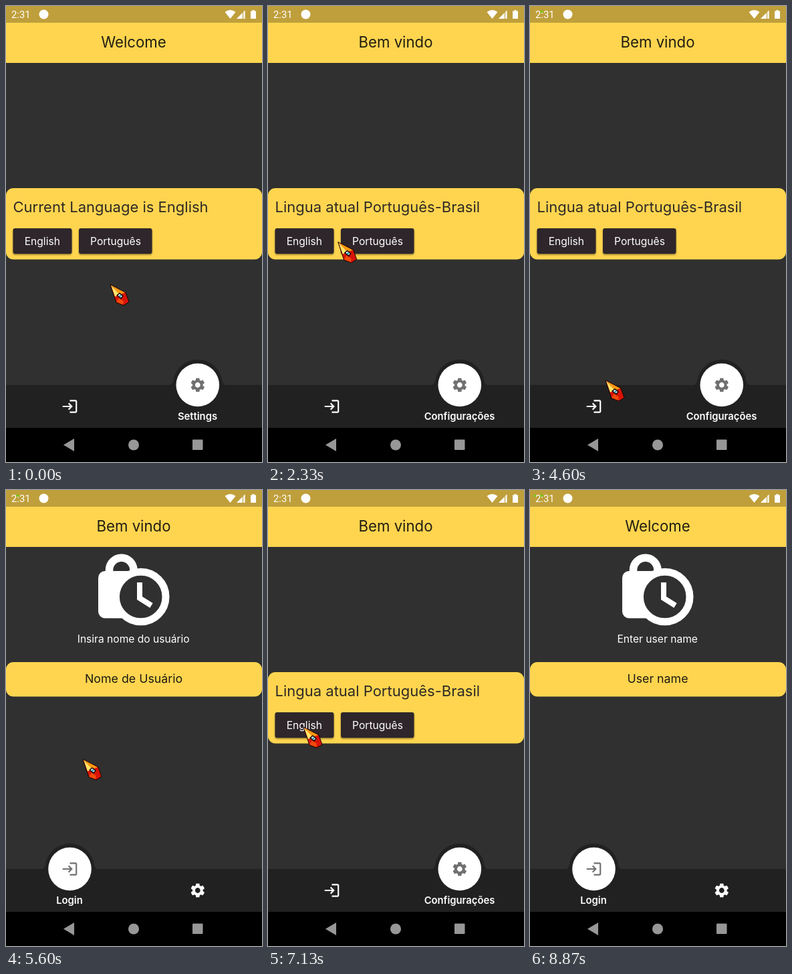
Animation, 383 px wide and 681 px high, one loop 9.94 s. Source, as an HTML page:

```html
<!DOCTYPE html>
<html lang="en">
<head>
<meta charset="utf-8">
<title>Language switch</title>
<style>
  html, body { margin: 0; width: 100%; height: 100%; overflow: hidden; background: #303030; }
  svg { display: block; width: 383px; height: 681px; font-family: Inter, sans-serif; }
  .mid { text-anchor: middle; }
  .tab { font-size: 14.8px; font-weight: 600; fill: #fff; }
  .button { font-size: 15.6px; fill: #fff; }
  .face { fill: #2f262b; }
</style>
</head>
<body>
<svg viewBox="0 0 383 681">
  <defs>
    <path id="loginIcon" d="M11 7 9.6 8.4l2.6 2.6H2v2h10.2l-2.6 2.6L11 17l5-5zm9 12h-8v2h8c1.1 0 2-.9 2-2V5c0-1.1-.9-2-2-2h-8v2h8z" transform="scale(1.08) translate(-12 -12)"/>
    <path id="settingsIcon" d="M19.14 12.94c.04-.3.06-.61.06-.94s-.02-.64-.07-.94l2.03-1.58c.18-.14.23-.41.12-.61l-1.92-3.32c-.12-.22-.37-.29-.59-.22l-2.39.96c-.5-.38-1.03-.7-1.62-.94l-.36-2.54c-.04-.24-.24-.41-.48-.41h-3.84c-.24 0-.43.17-.47.41l-.36 2.54c-.59.24-1.13.57-1.62.94l-2.39-.96c-.22-.08-.47 0-.59.22L2.74 8.87c-.12.21-.08.47.12.61l2.03 1.58c-.05.3-.09.63-.09.94s.02.64.07.94l-2.03 1.58c-.18.14-.23.41-.12.61l1.92 3.32c.12.22.37.29.59.22l2.39-.96c.5.38 1.03.7 1.62.94l.36 2.54c.05.24.24.41.48.41h3.84c.24 0 .44-.17.47-.41l.36-2.54c.59-.24 1.13-.56 1.62-.94l2.39.96c.22.08.47 0 .59-.22l1.92-3.32c.12-.22.07-.47-.12-.61zM12 15.6c-1.98 0-3.6-1.62-3.6-3.6s1.62-3.6 3.6-3.6 3.6 1.62 3.6 3.6-1.62 3.6-3.6 3.6z" transform="scale(1.08) translate(-12 -12)"/>
    <clipPath id="englishClip"><rect x="10.5" y="332" width="88" height="38" rx="3"/></clipPath>
    <clipPath id="portugueseClip"><rect x="109" y="332" width="109.5" height="38" rx="3"/></clipPath>
    <filter id="shadow" x="-10%" y="-20%" width="120%" height="150%">
      <feDropShadow dx="0" dy="1.5" stdDeviation="1.2" flood-opacity=".45"/>
    </filter>
  </defs>

  <rect width="383" height="681" fill="#303030"/>
  <rect width="383" height="85" fill="#ffd54f"/>
  <rect width="383" height="25" fill="#bf9f3b"/>
  <text x="8" y="18" font-size="14.8" fill="#fff" style="font-family:Roboto,sans-serif">2:31</text>
  <g fill="#fff">
    <circle cx="56.5" cy="12.5" r="7"/>
    <path d="M327.500 9Q335.500 3 343.500 9L335.500 19z"/>
    <path d="M357.500 6.500V19H345z" opacity=".35"/>
    <path d="M353.500 10.500V19H345zM355.500 8.500l2-2V19h-2z"/>
    <path d="M368.500 6h3v1.500h2.500V19h-8V7.500h2.500z"/>
  </g>
  <g fill="#7fc31c">
    <path id="leftDot" d="M5 7h4v3h-4z"/>
    <path id="rightDot" d="M15 7h5v3h-5z"/>
  </g>
  <text id="title" class="mid" x="191" y="62" font-size="22.2" fill="#211d12"></text>

  <g id="settingsPage">
    <rect y="272" width="383" height="106.500" rx="11" fill="#ffd54f"/>
    <text id="current" x="10.500" y="308" font-size="22" fill="#2f2926"></text>
    <g filter="url(#shadow)">
      <rect class="face" x="10.500" y="332" width="88" height="38" rx="3"/>
      <rect class="face" x="109" y="332" width="109.500" height="38" rx="3"/>
    </g>
    <circle id="ripple" fill="#fff"/>
    <text class="button mid" x="54.300" y="357">English</text>
    <text class="button mid" x="164" y="357">Português</text>
  </g>

  <g id="loginPage">
    <path d="M154.500 126v-6.500a18.200 18.200 0 0 1 36.400 0v6.500" fill="none" stroke="#fff" stroke-width="11.500"/>
    <rect x="138" y="121" width="68" height="70.500" rx="10" fill="#fff"/>
    <circle cx="201.700" cy="159.500" r="37.300" fill="#303030" stroke="#fff" stroke-width="11"/>
    <path d="M200 138v23.500l17.500 11" fill="none" stroke="#fff" stroke-width="8"/>
    <text id="prompt" class="mid" x="190.700" y="227.500" font-size="15.600" fill="#fff"></text>
    <rect y="257" width="383" height="51.500" rx="11" fill="#ffd54f"/>
    <text id="field" class="mid" x="191" y="288" font-size="17.800" fill="#1d1a12"></text>
  </g>

  <rect y="566" width="383" height="64" fill="#212121"/>
  <g id="loginTabIcon" fill="#fff"><use href="#loginIcon"/></g>
  <g id="settingsTabIcon" fill="#fff"><use href="#settingsIcon"/></g>
  <text id="loginLabel" class="tab mid" x="95">Login</text>
  <text id="settingsLabel" class="tab mid" x="286.500"></text>
  <g id="knob">
    <path d="M-45 .5Q-37 .5-36.500-7A37 37 0 0 1 36.500-7Q37 .5 45 .5z" fill="#212121"/>
    <circle r="32.300" fill="#fff"/>
    <g id="knobIcon" fill="#707070"><use id="knobUse"/></g>
  </g>

  <rect y="630" width="383" height="51" fill="#000"/>
  <g fill="#979797">
    <path d="M86 655.500l16-9.500v19z"/>
    <circle cx="191" cy="655.500" r="8"/>
    <rect x="279" y="647.500" width="15.500" height="15.500" rx="1"/>
  </g>

  <g id="cursor" stroke-linejoin="round">
    <path d="M0 0 23 12 28 26 20 31 9 27z" fill="#d81408" stroke="#170400"/>
    <path d="M1 1 22 12 14 15z" fill="#ff9c12"/>
    <path d="M1 1 14 15 7 18z" fill="#ffe66a"/>
    <path d="M9 26 13 20 20 25 19 30z" fill="#f04a0c"/>
    <path d="M9 16 14 12 20 17 16 22z" fill="#1c0d10"/>
    <path d="M11.500 16 14 14 18 17.500 15.500 19.500z" fill="#f4ffff"/>
    <circle cx="14.800" cy="17" r="1.500" fill="#18a2bd"/>
  </g>
</svg>
<script>
const LOOP = 9940, STEP = 1000 / 15, TAB_MS = 300;
const TAB_X = { login: 95.5, settings: 286.8 };
const words = {
  en: { title: "Welcome", current: "Current Language is English", prompt: "Enter user name",
        field: "User name", settingsLabel: "Settings" },
  pt: { title: "Bem vindo", current: "Lingua atual Português-Brasil", prompt: "Insira nome do usuário",
        field: "Nome de Usuário", settingsLabel: "Configurações" }
};
// [time, value] pairs, the latest one passed applies
const languages = [[-9999, "en"], [1730, "pt"], [2930, "en"], [4070, "pt"], [7330, "en"]];
const pages = [[-9999, "settings"], [5070, "login"], [6070, "settings"], [8400, "login"]];
// [time, x, y] of the pointer tip
const pointer = [
  [0, 156, 416], [70, 158, 426], [130, 161, 438], [270, 162, 439], [410, 162, 440],
  [870, 89, 362], [1270, 138, 353], [2000, 138, 353], [2670, 70, 352], [3330, 70, 352],
  [3800, 140, 354], [4070, 140, 354], [4600, 113, 559], [4800, 97, 591], [5070, 97, 591],
  [5600, 115, 402], [6000, 284, 597], [6530, 284, 595], [7000, 49, 355], [7130, 53, 354],
  [7400, 53, 354], [8200, 93, 598], [8470, 93, 598], [8870, 105, 690]
];

const $ = id => document.getElementById(id);
const clamp = v => Math.max(0, Math.min(1, v));
const mix = (a, b, p) => a + (b - a) * p;
const smooth = p => p * p * (3 - 2 * p);
const easeOut = p => 1 - (1 - p) ** 2.2;
const latest = (list, t) => list.findLast(item => item[0] <= t);
const set = (id, attrs) => { for (const k in attrs) $(id).setAttribute(k, attrs[k]); };
const show = (id, on) => set(id, { visibility: on ? "visible" : "hidden" });
const move = (id, x, y) => set(id, { transform: `translate(${x} ${y})` });

function pointerAt(t) {
  const i = pointer.findLastIndex(k => k[0] <= t);
  const a = pointer[i], b = pointer[i + 1] || a;
  const p = a === b ? 0 : smooth((t - a[0]) / (b[0] - a[0]));
  return [mix(a[1], b[1], p), mix(a[2], b[2], p)];
}

function drawRipple(t, [since, language]) {
  const age = t - since;
  const [x, y] = pointerAt(Math.max(0, since));
  set("ripple", {
    cx: x, cy: y, r: Math.min(120, age * .5),
    opacity: .24 * (1 - clamp((age - 360) / 160)),
    "clip-path": `url(#${language === "en" ? "english" : "portuguese"}Clip)`
  });
}

function drawTabs(t, [since, page]) {
  const p = clamp((t - since) / TAB_MS);
  const previous = page === "login" ? "settings" : "login";
  move("knob", mix(TAB_X[previous], TAB_X[page], easeOut(p)), 566);
  set("knobUse", { href: `#${p < .35 ? previous : page}Icon` });
  set("knobIcon", { opacity: p < .35 ? 1 - p / .35 : clamp((p - .35) / .5) });
  for (const tab of ["login", "settings"]) {
    const active = tab === page ? p : 1 - p;
    move(tab + "TabIcon", TAB_X[tab], 598 - 32 * active * active);
    set(tab + "TabIcon", { opacity: 1 - active });
    set(tab + "Label", { y: mix(654, 618, active * active) });
  }
}

function draw(t) {
  const language = latest(languages, t), page = latest(pages, t);
  const text = words[language[1]];
  for (const id in text) $(id).textContent = text[id];
  show("settingsPage", page[1] === "settings");
  show("loginPage", page[1] === "login");
  show("leftDot", (t >= 2930 && t < 4070) || t >= 7330);
  show("rightDot", (t >= 4070 && t < 6070) || t >= 8400);
  drawRipple(t, language);
  drawTabs(t, page);
  move("cursor", ...pointerAt(t));
}

function frame() {
  const n = Math.floor((performance.now() % LOOP + 4) / STEP);
  draw(Math.round(n * STEP / 10) * 10);
  requestAnimationFrame(frame);
}
frame();
</script>
</body>
</html>
```
